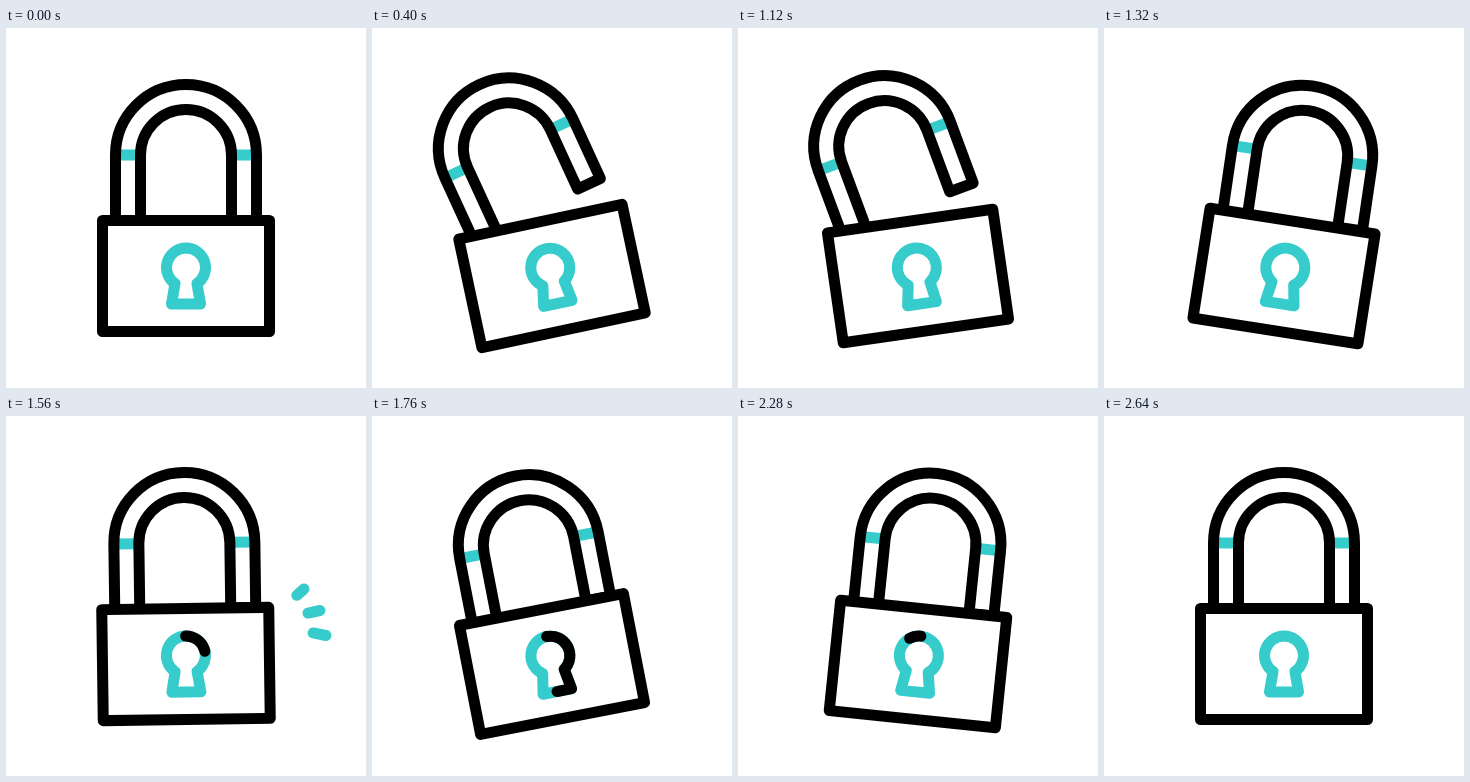
Animation, 360 px wide and 360 px high, one loop 3 s. Source, as an HTML page:

```html
<!DOCTYPE html>
<html lang="en">
<head>
<meta charset="utf-8">
<title>Padlock</title>
<style>
  html, body { margin: 0; width: 100%; height: 100%; overflow: hidden; background: #fff; }
  svg { display: block; width: 100%; height: 100%; }
  path, rect { fill: none; stroke: #000; stroke-width: 11; stroke-linecap: round; stroke-linejoin: round; }
  .accent { stroke: #36cccb; }
  .flat { stroke-linecap: butt; }
  #case { fill: #fff; }
</style>
</head>
<body>
<svg viewBox="0 0 360 360">
  <g id="lock">
    <g id="shackle">
      <path class="accent flat" d="M112 127H132M228 127H248"/>
      <path d="M109.5 203V127a70.5 70.5 0 0 1 141 0V192.5H225.5V127a45.5 45.5 0 0 0 -91 0V203"/>
    </g>
    <rect id="case" x="96.5" y="192.5" width="167" height="111"/>
    <path id="keyhole" class="accent" d="M180 220a19.5 19.5 0 0 1 11 35.6L194.5 276H165.5L169 255.6A19.5 19.5 0 0 1 180 220Z"/>
    <path id="tracer" pathLength="1"/>
  </g>
  <g id="sparks"></g>
</svg>
<script>
const LOOP = 3000;
const byId = id => document.getElementById(id);
const lock = byId('lock'), shackle = byId('shackle'), tracer = byId('tracer');
tracer.setAttribute('d', byId('keyhole').getAttribute('d'));

const sparks = ['M286 183.5L298 173', 'M294 198.7L314 194.5', 'M298.5 215.3L320 219.5'].map(d => {
  const path = document.createElementNS('http://www.w3.org/2000/svg', 'path');
  path.setAttribute('d', d);
  path.setAttribute('pathLength', 1);
  path.setAttribute('class', 'accent');
  return byId('sparks').appendChild(path);
});

const smooth = x => x * x * (3 - 2 * x);
const easeOut = x => 1 - Math.pow(1 - x, 3.6);

function ramp(t, from, to, ease = smooth) {
  return ease(Math.min(1, Math.max(0, (t - from) / (to - from))));
}

// Each key is [time, value, easing towards this key].
function keyed(t, keys) {
  let value = keys[0][1];
  for (let i = 1; i < keys.length; i++) {
    const [from, start] = keys[i - 1], [to, end, ease] = keys[i];
    value += (end - start) * ramp(t, from, to, ease);
  }
  return value;
}

const swing = [[200, 0], [960, -18, easeOut], [1360, 9.6], [1760, -11], [2160, 7], [2640, 0]];
const opening = [[200, 0], [960, -18.9, easeOut], [1360, 0]];

function trim(path, start, end) {
  const length = end - start;
  path.style.display = length > 0.001 ? '' : 'none';
  path.setAttribute('stroke-dasharray', length >= 0.999 ? 'none' : `${length} 2`);
  path.setAttribute('stroke-dashoffset', -start);
}

function draw(t) {
  lock.setAttribute('transform', `rotate(${keyed(t, swing)} 180 248)`);
  shackle.setAttribute('transform', `rotate(${keyed(t, opening)} 115 190.5)`);
  trim(tracer, ramp(t, 1760, 2380), ramp(t, 1360, 2160));
  const head = ramp(t, 1360, 1560), tail = ramp(t, 1440, 1720);
  sparks.forEach(spark => trim(spark, tail, head));
}

const began = performance.now();
function frame() {
  draw((performance.now() - began) % LOOP);
  requestAnimationFrame(frame);
}
frame();
</script>
</body>
</html>
```
